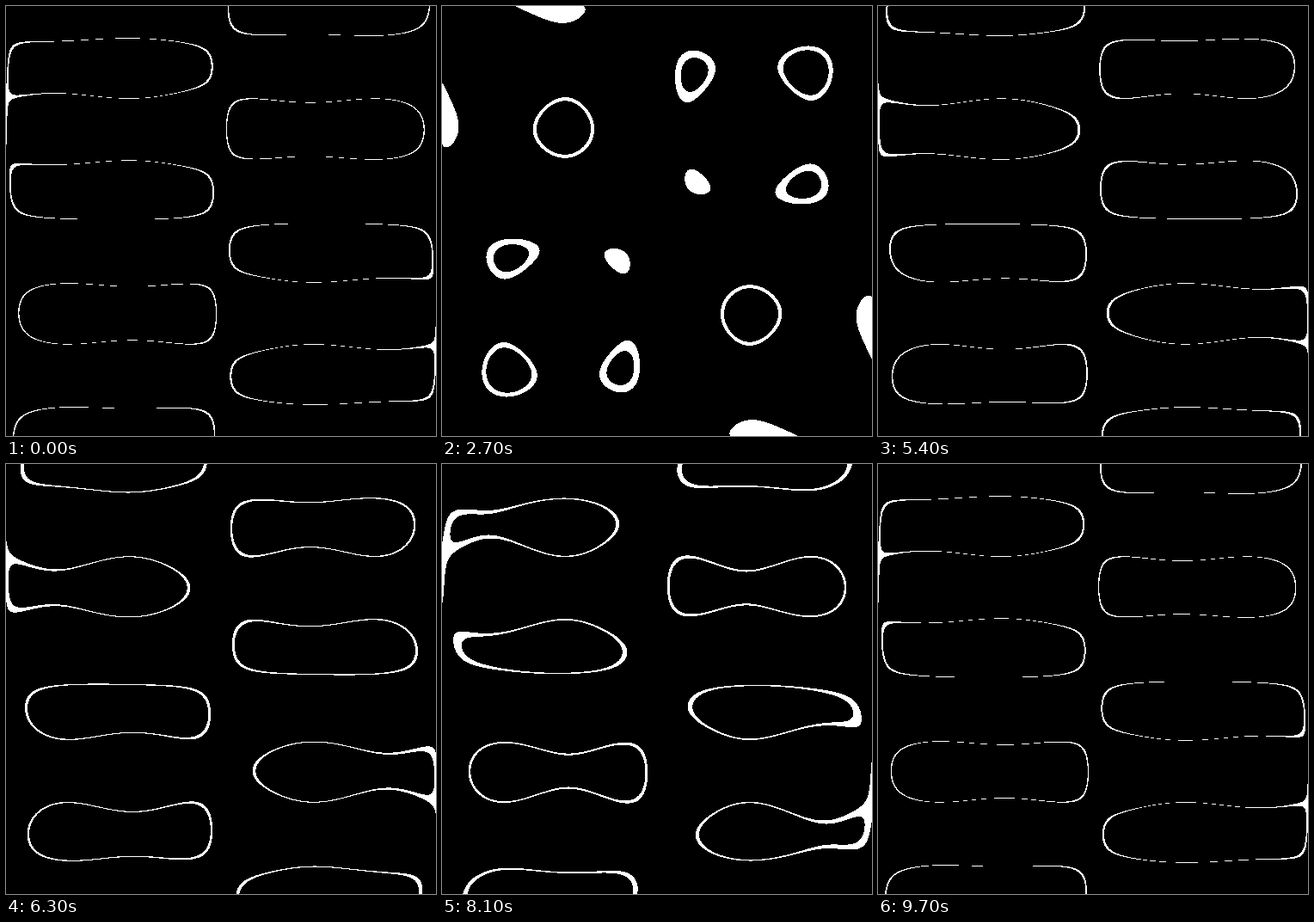
An HTML page with a canvas that plays this animation: 500 px wide and 500 px high, repeating every 9800 ms.

```html
<!DOCTYPE html>
<html lang="en">
<head>
<meta charset="utf-8">
<title>Standing wave</title>
<style>
  html, body { margin: 0; width: 100%; height: 100%; overflow: hidden; background: #000; }
  canvas { display: block; width: 500px; height: 500px; }
</style>
</head>
<body>
<canvas id="stage" width="500" height="500"></canvas>
<script>
  const SIZE = 500, STEP = 100, HALF = 49, PEAK = 10;
  const LEVEL = 1, BAND = 0.1;
  const ctx = document.getElementById('stage').getContext('2d');
  const image = ctx.createImageData(SIZE, SIZE);
  const pixels = new Uint32Array(image.data.buffer);
  const WHITE = 0xffffffff, BLACK = 0xff000000;

  // sin(n * pi * u) sampled across the stage, u from -0.5 to 0.5
  const wave = n => Float64Array.from({ length: SIZE },
    (_, i) => Math.sin(n * Math.PI * (i - SIZE / 2) / SIZE));
  const slow = wave(2), fast = wave(7);

  // Amplitude runs evenly from +PEAK to -PEAK and back
  function amplitude(step) {
    const k = step <= HALF ? step : 2 * HALF - step;
    return PEAK * (1 - 2 * k / HALF);
  }

  // White wherever the sum of the two modes lies close to LEVEL
  function draw(step) {
    const a = amplitude(step);
    let p = 0;
    for (let y = 0; y < SIZE; y++) {
      const f = a * fast[y], s = slow[y];
      for (let x = 0; x < SIZE; x++) {
        const value = f * slow[x] - s * fast[x];
        pixels[p++] = Math.abs(value - LEVEL) < BAND ? WHITE : BLACK;
      }
    }
    ctx.putImageData(image, 0, 0);
  }

  const start = performance.now();
  let shown = -1;
  function tick() {
    const elapsed = performance.now() - start;
    const step = Math.floor(elapsed / STEP) % (2 * HALF);
    if (step !== shown) draw(shown = step);
    requestAnimationFrame(tick);
  }
  tick();
</script>
</body>
</html>
```
